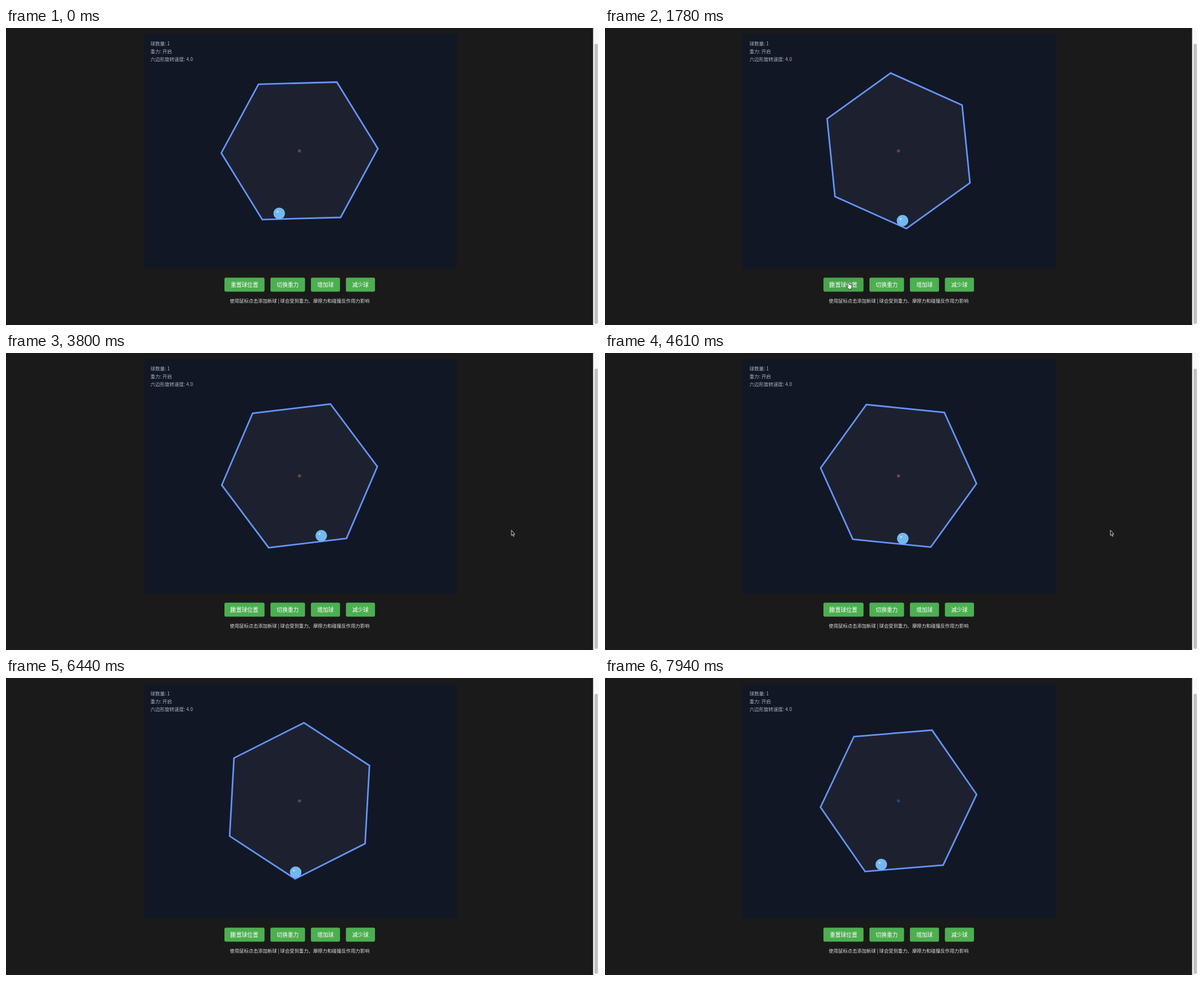
An HTML page that plays this animation: 1056x530 px, repeating every 8000 ms.

```html
<!DOCTYPE html>
<html lang="zh">
<head>
<meta charset="utf-8">
<title>六边形与球</title>
<style>
  html, body { margin: 0; width: 100%; height: 100%; overflow: hidden; background: #1a1a1a; }
  svg { display: block; width: 1056px; height: 530px; }
  text { font-family: "Noto Sans CJK SC", "Noto Sans CJK", "Noto Sans", sans-serif; }
  .info { font-size: 8.5px; fill: #aeb2ba; }
  .label { font-size: 9.8px; font-weight: 500; fill: #fff; text-anchor: middle; }
  .hint { font-size: 8.4px; fill: #dedede; text-anchor: middle; }
  .button { fill: #4caf50; }
</style>
</head>
<body>
<svg viewBox="0 0 1056 530">
  <rect width="1056" height="530" fill="#1a1a1a"/>
  <rect x="245" y="11" width="558" height="418" fill="#111725"/>
  <text class="info" x="257.3" y="31">球数量: 1</text>
  <text class="info" x="257.3" y="45">重力: 开启</text>
  <text class="info" x="257.3" y="59">六边形旋转速度: 4.0</text>

  <polygon id="hex" fill="#1d212f" stroke="#6495fb" stroke-width="2.8"/>
  <circle id="hub" cx="522.6" cy="219.2" r="2.8"/>
  <g id="ball">
    <circle r="10.3" fill="#74b8f1"/>
    <circle cx="-3" cy="-3" r="1.7" fill="#fff" opacity=".6"/>
  </g>

  <g id="buttons"></g>
  <rect id="caret" x="400.2" y="453" width="1" height="10.5" fill="#fff"/>
  <text class="hint" x="523" y="489.8">使用鼠标点击添加新球 | 球会受到重力、摩擦力和碰撞反作用力影响</text>

  <rect x="1045.5" width="10.5" height="530" fill="#f9f9f9"/>
  <rect x="1048" y="28" width="6" height="500" rx="3" fill="#c1c1c1"/>

  <path id="arrow" d="M0 0V9.6L2 7.8 3.5 11.2 4.9 10.6 3.5 7.3H6.2Z"
    fill="#15181f" stroke="#dcdcdc" stroke-width=".9" stroke-linejoin="round"/>
  <path id="hand" d="M-2 -1.4C-1.6 -2.6 0 -2.4 .4 -1.2L1.2 1.6 4.6 2.6Q6 3.2 5.6 6L4.8 10H-.2L-2.8 6.2Q-3.4 4.6 -1.2 5Z"
    fill="#f4f4f4" stroke="#222" stroke-width=".9" stroke-linejoin="round"/>
</svg>
<script>
const LOOP = 8000, CX = 522.75, CY = 219.2, R = 139.5, GAP = 10.2;
const $ = id => document.getElementById(id);
const rad = deg => deg * Math.PI / 180;

// [ms, degrees]
const turn = [[0, -1.6], [1780, 24.24], [3100, 43.7], [4610, 65.75],
  [5770, 82.87], [6440, 93.2], [7940, 115.3], [8000, 116.2]];

// [ms, x] before and after the ball is reset
const RESET = 2050, LAND = 2675, HOP = 270;
const rollA = [[0, 486.5], [300, 489], [600, 501], [900, 522], [1200, 542],
  [1400, 545.5], [1600, 538], [1780, 529.8], [1900, 531], [2050, 527]];
const rollB = [[2050, 522.8], [2675, 577], [2945, 605], [3100, 610.3], [3400, 594],
  [3700, 566], [4000, 541], [4300, 528], [4610, 530.3], [4900, 541], [5200, 553],
  [5450, 548.7], [5770, 538.6], [6440, 515.8], [6800, 504], [7200, 494],
  [7550, 490], [7940, 492], [8000, 493]];

const mouse = [[350, 1040, 330], [850, 434, 456], [2680, 434, 456],
  [3100, 614, 341], [3400, 900, 316], [5400, 900, 316]];
const hubColor = [[0, "#594a4b"], [960, "#6b4048"], [2640, "#753f4a"],
  [6070, "#4b4b56"], [6890, "#30406c"]];

// Screen updates: [first, last, count]
const runs = [[90, 890, 11], [960, 1670, 10], [1780, 2540, 11], [2640, 3420, 11],
  [3520, 4290, 11], [4380, 5140, 11], [5220, 5970, 11], [6070, 6780, 10],
  [6890, 7620, 11], [7710, 7940, 4]];
const ticks = [0];
for (const [a, b, n] of runs)
  for (let i = 0; i < n; i++) {
    const t = a + (b - a) * i / (n - 1);
    const key = turn.find(k => Math.abs(k[0] - t) < 30);
    ticks.push(key ? key[0] : t);
  }

function segment(keys, t) {
  let i = 0;
  while (i < keys.length - 2 && t >= keys[i + 1][0]) i++;
  const a = keys[i][0], b = keys[i + 1][0];
  return [i, Math.max(0, Math.min(1, (t - a) / (b - a)))];
}

function linear(keys, t, col = 1) {
  const [i, u] = segment(keys, t);
  return keys[i][col] + (keys[i + 1][col] - keys[i][col]) * u;
}

function smooth(keys, t) {
  const [i, u] = segment(keys, t);
  const slope = j => {
    const p = keys[Math.max(0, j - 1)], q = keys[Math.min(keys.length - 1, j + 1)];
    return (q[1] - p[1]) / (q[0] - p[0]);
  };
  const [a, x] = keys[i], [b, y] = keys[i + 1], d = b - a, v = 1 - u;
  return v * v * (1 + 2 * u) * x + u * u * (3 - 2 * u) * y
    + d * u * v * (v * slope(i) - u * slope(i + 1));
}

// Lowest height at x for a ball resting inside the turned hexagon
function floorY(x, deg) {
  const reach = R * Math.cos(rad(30)) - GAP;
  let y = Infinity;
  for (let i = 0; i < 6; i++) {
    const n = rad(deg + 30 + 60 * i);
    if (Math.sin(n) > .05) y = Math.min(y, CY + (reach - (x - CX) * Math.cos(n)) / Math.sin(n));
  }
  return y;
}

function ballAt(t, deg) {
  const x = t < RESET ? smooth(rollA, t) : t < LAND ? linear(rollB, t) : smooth(rollB, t);
  let y = floorY(x, deg);
  if (t >= RESET && t < LAND) {
    const s = (t - RESET) / 1000;
    y = Math.min(y, CY + 250 * s * s);
  } else if (t >= LAND && t < LAND + HOP) {
    const u = (t - LAND) / HOP;
    y -= 40 * u * (1 - u);
  }
  return [x, y];
}

function place(el, x, y) {
  el.setAttribute("transform", `translate(${x.toFixed(2)} ${y.toFixed(2)})`);
}

const show = (el, on) => el.setAttribute("visibility", on ? "visible" : "hidden");

let left = 389;
$("buttons").innerHTML = ["重置球位置", "切换重力", "增加球", "减少球"].map(s => {
  const w = s.length * 9.8 + 22.4, x = left;
  left += w + 10.5;
  return `<rect class="button" x="${x}" y="445.5" width="${w}" height="25" rx="2.8"/>
    <text class="label" x="${x + w / 2}" y="461.6">${s}</text>`;
}).join("");
const firstButton = $("buttons").querySelector("rect");

function draw(now) {
  const clock = now % LOOP;
  const t = ticks.filter(k => k <= clock + .01).pop();
  const deg = linear(turn, t);

  $("hex").setAttribute("points", [0, 1, 2, 3, 4, 5].map(i => {
    const a = rad(deg + 60 * i);
    return `${(CX + R * Math.cos(a)).toFixed(2)},${(CY + R * Math.sin(a)).toFixed(2)}`;
  }).join(" "));
  place($("ball"), ...ballAt(t, deg));
  $("hub").setAttribute("fill", hubColor.filter(k => k[0] <= t).pop()[1]);

  const mx = linear(mouse, t), my = linear(mouse, t, 2);
  const seen = t >= mouse[0][0] && t < mouse[mouse.length - 1][0];
  const over = seen && mx > 389 && mx < 460 && my > 445 && my < 471;
  place($("arrow"), mx, my);
  place($("hand"), mx, my);
  show($("arrow"), seen && !over);
  show($("hand"), over);
  firstButton.style.fill = over ? "#48a54c" : "";
  show($("caret"), t >= 1500 && t < 7700);
}

function frame() {
  draw(performance.now());
  requestAnimationFrame(frame);
}
frame();
</script>
</body>
</html>
```
